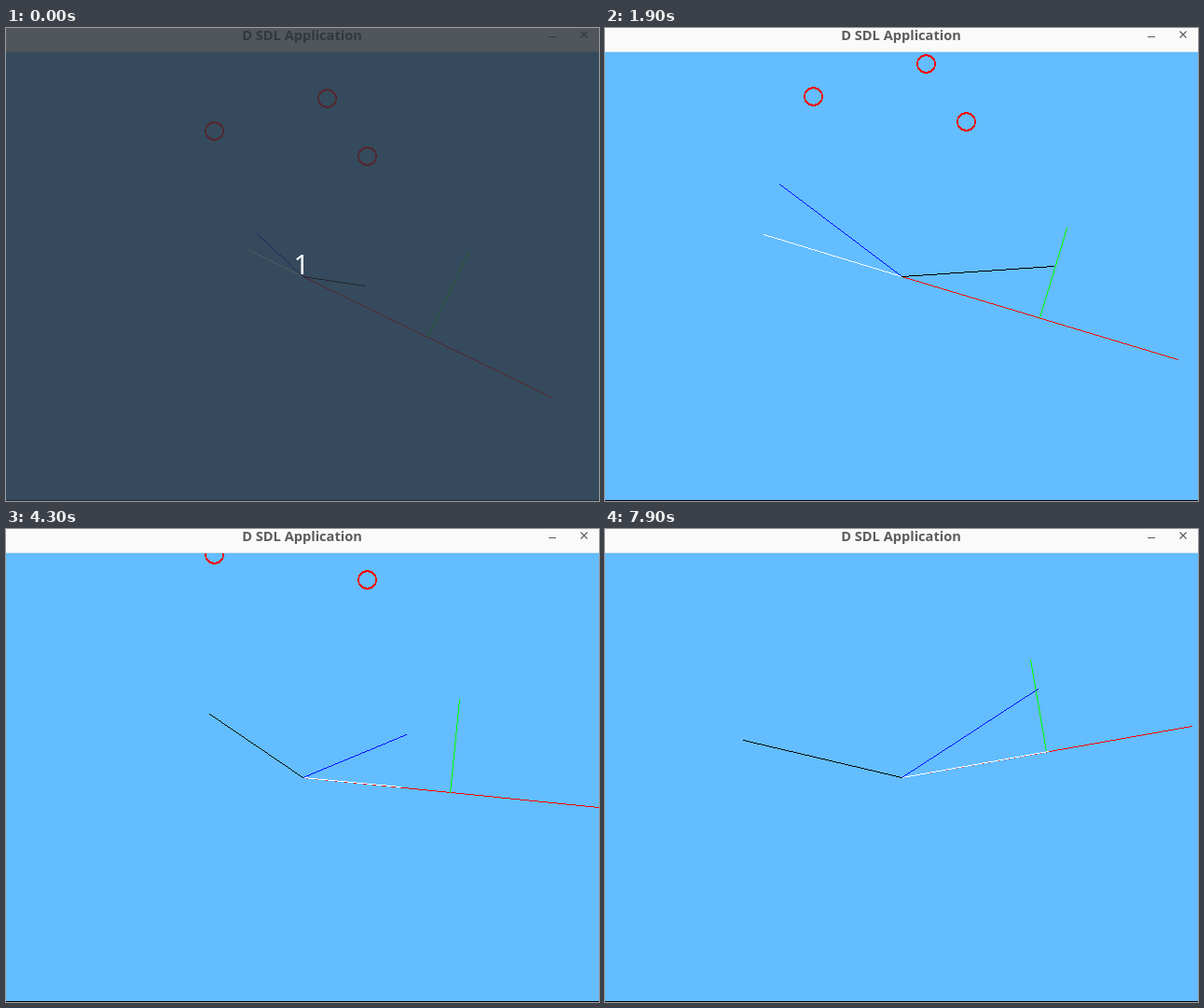
Recreate the animation shown at these times as an HTML page with a canvas. Size 636 px wide and 507 px high, loop 8 s.

```html
<!DOCTYPE html>
<html lang="en">
<head>
<meta charset="utf-8">
<title>D SDL Application</title>
<style>
  html, body { margin: 0; width: 100%; height: 100%; overflow: hidden; }
  #stage { position: relative; width: 636px; height: 507px; overflow: hidden; background: #63bdff; }
  canvas, svg { position: absolute; left: 0; top: 0; display: block; }
  .title { font: 700 14.6px "Open Sans", "Noto Sans", sans-serif; fill: #5c5c5c; }
  .count { font: 400 29.5px "Noto Sans", sans-serif; fill: #fff; }
</style>
</head>
<body>
<div id="stage">
  <canvas id="scene" width="636" height="507"></canvas>
  <svg width="636" height="507">
    <rect width="636" height="25" fill="#fafafa"/>
    <rect y="25" width="636" height="1" fill="#d5e2ec"/>
    <text class="title" x="317.5" y="13" text-anchor="middle">D SDL Application</text>
    <path d="M582 9.5h8M616.5 3.5l7 7m0-7l-7 7" fill="none" stroke="#5c5c5c" stroke-width="1.2"/>
    <rect y="506" width="636" height="1" fill="#000"/>
    <g id="dim">
      <rect width="636" height="507" fill="rgb(43,48,56)" fill-opacity=".81"/>
      <text class="count" x="308.4" y="264">1</text>
    </g>
  </svg>
</div>
<script>
const LOOP = 8000, STEP = 100;
const ctx = document.getElementById('scene').getContext('2d');
const dim = document.getElementById('dim');
const origin = [318, 266];

// The red line's end runs along an ellipse
const RADII = [320, 240], START_ANGLE = 33, TURN = 5.85;

// Balls drift upwards together
const balls = [[223, 110], [344, 74.6], [387, 137]], RISE = 19.4;

// Turning points of the pointer: seconds, x, y
const pointer = [
  [0, -49, -46], [1, -49, -103], [1.9, -131, -99], [2.8, -14, -79], [4.3, 111, -46],
  [5.5, 162, -69], [6.6, 190, -102], [7.2, 238, -116], [7.9, 146, -95]
];

function pointerAt(t) {
  const i = Math.max(1, pointer.findIndex(p => p[0] >= t));
  const [t0, ...a] = pointer[i - 1], [t1, ...b] = pointer[i];
  const k = (t - t0) / (t1 - t0);
  return a.map((v, n) => v + (b[n] - v) * k);
}

const dot = (x, y) => ctx.fillRect(x, y, 1, 1);

// Hard-edged one pixel line between offsets from the origin
function line(color, from, to) {
  const [x0, y0, x1, y1] = [...from, ...to].map((v, i) => Math.floor(origin[i % 2] + v));
  const dx = x1 - x0, dy = y1 - y0;
  const n = Math.max(Math.abs(dx), Math.abs(dy)) || 1;
  ctx.fillStyle = color;
  for (let i = 0; i <= n; i++) dot(Math.round(x0 + dx * i / n), Math.round(y0 + dy * i / n));
}

// Slightly heavier at the top and bottom than at the sides
function ring(cx, cy) {
  ctx.fillStyle = '#f00';
  for (let y = -10; y <= 10; y++)
    for (let x = -10; x <= 10; x++)
      if (Math.hypot(x, y) <= 10.3 && Math.hypot(x / 8.7, y / 8.1) >= 1) dot(cx + x, cy + y);
}

function draw(ms) {
  const t = Math.floor(ms / STEP) * STEP / 1000;
  ctx.fillStyle = '#63bdff';
  ctx.fillRect(0, 0, 636, 507);

  for (const [x, y] of balls) ring(x, Math.round(y - RISE * t));

  const angle = (START_ANGLE - TURN * t) * Math.PI / 180;
  const end = [RADII[0] * Math.cos(angle), RADII[1] * Math.sin(angle)];
  const len = Math.hypot(...end);
  const d = end.map(c => c / len);
  const mid = end.map(c => c / 2);

  const v = pointerAt(t);
  const dotted = v[0] * d[0] + v[1] * d[1];
  const shadow = d.map(c => c * dotted);
  const bounce = v.map((c, i) => c - 2 * shadow[i]);

  line('#f00', [0, 0], end);
  line('#0f0', mid, [mid[0] + d[1] * 100, mid[1] - d[0] * 100]);
  line('#fff', [0, 0], shadow);
  line('#00f', [0, 0], v);
  line('#000', [0, 0], bounce);

  dim.style.display = t < 0.1 ? '' : 'none';
}

const start = performance.now();
function tick() {
  draw((performance.now() - start) % LOOP);
  requestAnimationFrame(tick);
}
tick();
</script>
</body>
</html>
```
